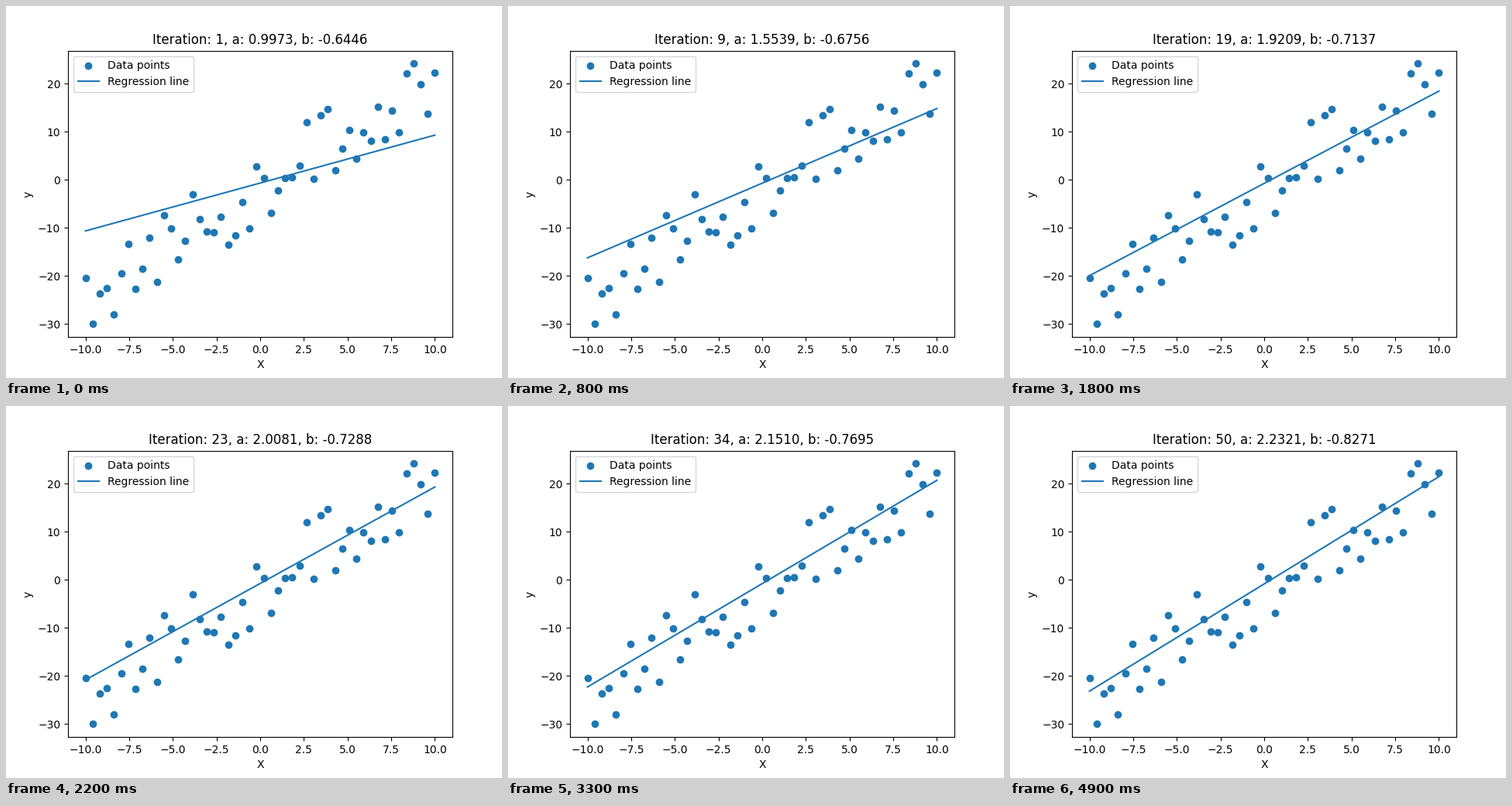
Animation, 640 px wide and 480 px high, one loop 5 s. Source, as a matplotlib script:

```python
import matplotlib.pyplot as plt
import numpy as np
from matplotlib.animation import FuncAnimation

FRAMES = 50
INTERVAL = 100
LEARNING_RATE = 0.001

x = np.linspace(-10, 10, 50)
y = np.array([
    -20.45, -30.00, -23.68, -22.55, -28.03, -19.48, -13.35, -22.71, -18.52, -12.06,
    -21.26, -7.39, -10.13, -16.58, -12.71, -3.03, -8.19, -10.77, -10.94, -7.71,
    -13.52, -11.58, -4.65, -10.13, 2.77, 0.35, -6.90, -2.23, 0.35, 0.52,
    2.94, 11.97, 0.19, 13.42, 14.71, 1.97, 6.48, 10.35, 4.39, 9.87,
    8.10, 15.19, 8.42, 14.39, 9.87, 22.13, 24.20, 19.87, 13.74, 22.29,
])

# Least-squares optimum and the parameters after the first descent step
A_BEST, B_BEST = 2.2696, -2.5977
A_FIRST, B_FIRST = 0.9973, -0.6446

# x is centred on zero, so each parameter decays independently
A_DECAY = 1 - 2 * LEARNING_RATE * np.mean(x ** 2)
B_DECAY = 1 - 2 * LEARNING_RATE


def parameters(step):
    a = A_BEST + (A_FIRST - A_BEST) * A_DECAY ** step
    b = B_BEST + (B_FIRST - B_BEST) * B_DECAY ** step
    return a, b


fig, ax = plt.subplots(figsize=(6.4, 4.8), dpi=100)
ax.scatter(x, y, color="C0", label="Data points")
line, = ax.plot([], [], color="C0", label="Regression line")
ax.set_xlim(-11, 11)
ax.set_ylim(-32.71, 26.91)
ax.set_xlabel("X")
ax.set_ylabel("y")
ax.legend(loc="upper left")
title = ax.set_title("")


def update(frame):
    a, b = parameters(frame)
    line.set_data(x, a * x + b)
    title.set_text(f"Iteration: {frame + 1}, a: {a:.4f}, b: {b:.4f}")
    return line, title


animation = FuncAnimation(fig, update, frames=FRAMES, interval=INTERVAL,
                          repeat=True, repeat_delay=0, blit=False)
plt.show()
```
